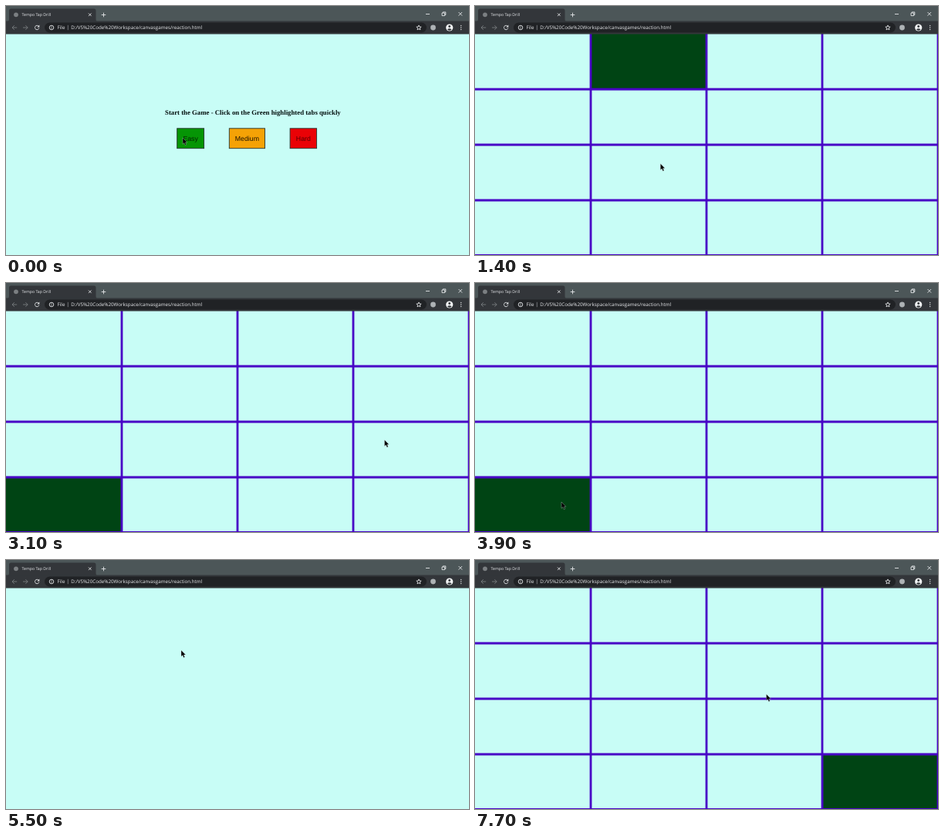
An HTML page for the animation above (8 s loop, 600x323 px).

```html
<!DOCTYPE html>
<html lang="en">
<head>
<meta charset="utf-8">
<title>Tempo Tap Drill</title>
<style>
html, body { margin: 0; width: 100%; height: 100%; overflow: hidden; background: #c8fdf6; }
svg { display: block; width: 600px; height: 323px; }
text { text-rendering: geometricPrecision; white-space: pre; }
.ui { font-family: "Open Sans", "Noto Sans", sans-serif; fill: #e8eaed; }
.head { font: bold 8.78px "Liberation Serif", serif; fill: #051010; }
.btn { font: 8.78px "Liberation Sans", sans-serif; text-anchor: middle; }
.line { fill: none; stroke: #e3e5e7; stroke-width: .9; }
.dim { stroke: #797d80; }
</style>
</head>
<body>
<svg viewBox="0 0 600 323" xmlns="http://www.w3.org/2000/svg">
  <rect width="600" height="323" fill="#c8fdf6"/>

  <g id="menu">
    <text class="head" x="206" y="141.2">Start the Game - Click on the Green highlighted tabs quickly</text>
    <g id="buttons"></g>
  </g>

  <g id="board">
    <rect id="cell" width="150" height="72" fill="#004414"/>
    <path id="lines" fill="none" stroke="#4802c6" stroke-width="2.8"/>
  </g>

  <g id="browser">
    <rect width="600" height="20" fill="#4c5658"/>
    <path d="M2 20Q4 20 4 17V6Q4 3.500 6.500 3.500H114Q116.500 3.500 116.500 6V17Q116.500 20 118.500 20Z" fill="#33363a"/>
    <rect y="19.500" width="600" height="17" fill="#33363a"/>
    <rect x="50" y="21.500" width="495" height="13" rx="6.500" fill="#202225"/>
    <circle id="icon" cx="13" cy="11.300" r="2.900" fill="#7b7f82"/>
    <text class="ui" x="20.500" y="13.300" font-size="5.200">Tempo Tap Drill</text>
    <path class="line" d="M107 9.500l3.600 3.600m0-3.600l-3.600 3.600M123.700 11.500h5.600m-2.800-2.800v5.600"/>
    <path class="line" stroke-width=".7" d="M544 10.500h5M565 9h3.600v3.600H565ZM566.200 9V7.900h3.600v3.600h-1.200M586.500 8l4.600 4.600m0-4.600l-4.600 4.600"/>
    <path class="line dim" d="M14.200 28H8m2.800-2.800L8 28l2.800 2.800M22 28h6.200m-2.800-2.800L28.200 28l-2.800 2.800"/>
    <g id="reload">
      <path class="line" d="M42.300 26.300A2.700 2.700 0 1 0 42.800 28.700"/>
      <path d="M43.300 24.600v2.900h-2.900Z" fill="#e3e5e7"/>
    </g>
    <path id="stop" class="line" stroke-width="1.100" d="M37.800 25.600l4.800 4.800m0-4.800l-4.800 4.800"/>
    <circle class="line" cx="59" cy="28" r="2.800" stroke-width=".7"/>
    <path class="line" stroke-width=".7" d="M59 27.700v1.700M59 26.300v.7"/>
    <text class="ui" x="66.500" y="30.200" font-size="6.250">File</text>
    <path class="line dim" stroke-width=".6" d="M80.300 24.800v6.400"/>
    <text class="ui" x="84.300" y="30.200" font-size="6.250">D:/VS%20Code%20Workspace/canvasgames/reaction.html</text>
    <path id="star" class="line" stroke-width=".7"/>
    <circle cx="553.500" cy="28" r="3.400" fill="#aeb2b5"/>
    <circle cx="574.700" cy="28" r="4.600" fill="#f1f3f4"/>
    <circle cx="574.700" cy="26.500" r="1.400" fill="#33363a"/>
    <path d="M571.900 30.500q2.800-2.300 5.600 0q-2.800 2.400-5.600 0Z" fill="#33363a"/>
    <g fill="#e3e5e7">
      <circle cx="589.700" cy="25.500" r=".7"/>
      <circle cx="589.700" cy="28" r=".7"/>
      <circle cx="589.700" cy="30.500" r=".7"/>
    </g>
  </g>

  <path id="cursor" d="M0 0V8.300L1.900 6.600L3.200 9.700L4.700 9.100L3.400 6.100H5.900Z" fill="#000" stroke="#eefffc" stroke-width=".3"/>
</svg>
<script>
const LOOP = 8000, CELL_W = 150, CELL_H = 72, TOP = 36;
const $ = id => document.getElementById(id);
const show = (id, on) => $(id).setAttribute("visibility", on ? "visible" : "hidden");

// label, left, width, fill, text colour
const buttons = [
  ["Easy", 221.3, 35.7, "#059505", "#012401"],
  ["Medium", 288.9, 47, "#f5a206", "#1d1200"],
  ["Hard", 367.7, 35.3, "#ea0206", "#560000"]
];
$("buttons").innerHTML = buttons.map(([label, x, w, fill, ink]) =>
  `<rect x="${x + .4}" y="158.800" width="${w - .8}" height="25.900" fill="${fill}" stroke="#26332f" stroke-width=".9"/>
   <text class="btn" x="${x + w / 2}" y="174.500" fill="${ink}">${label}</text>`).join("");

$("lines").setAttribute("d", [1, 2, 3, 4].map(i => {
  const x = i * CELL_W, y = TOP + i * CELL_H;
  return `M${x} ${TOP}V323M0 ${Math.min(y, 323.4)}H600`;
}).join(""));

$("star").setAttribute("d", "M" + Array.from({ length: 10 }, (_, i) => {
  const r = i % 2 ? 1.5 : 3.3, a = i * Math.PI / 5;
  return `${(535 + r * Math.sin(a)).toFixed(2)} ${(28.2 - r * Math.cos(a)).toFixed(2)}`;
}).join("L") + "Z");

// start time, scene, lit row, lit column
const scenes = [
  [0, "menu"],
  [400, "board", 0, 1],
  [2100, "board", 2, 3],
  [3100, "board", 3, 0],
  [4000, "board", 1, 3],
  [5500, "blank"],
  [6300, "menu"],
  [7000, "board", 3, 3]
];

// start time, end time, x, y reached
const moves = [
  [0, 0, 229, 171],
  [950, 1200, 240.3, 204.5],
  [1400, 2150, 262.3, 82.5],
  [2450, 2900, 490.5, 203.5],
  [3150, 3900, 112, 284],
  [4150, 4600, 229.3, 113.3],
  [5450, 5500, 227, 117],
  [5750, 5800, 219.5, 130],
  [6050, 6450, 242, 171.5],
  [7250, 7700, 377.5, 174]
];

const ease = p => p * p * (3 - 2 * p);

function pointer(t) {
  let [, , x, y] = moves[0];
  for (const [from, to, nx, ny] of moves.slice(1)) {
    if (t <= from) break;
    const k = ease(Math.min(1, (t - from) / (to - from)));
    x += (nx - x) * k;
    y += (ny - y) * k;
  }
  return [x, y];
}

function draw(t) {
  const [, scene, row, col] = scenes.filter(s => s[0] <= t).pop();
  show("menu", scene === "menu");
  show("board", scene === "board");
  if (scene === "board") {
    $("cell").setAttribute("x", col * CELL_W);
    $("cell").setAttribute("y", TOP + row * CELL_H);
  }
  const loading = t >= 6200 && t < 6700;
  show("icon", !loading);
  show("reload", !loading);
  show("stop", loading);
  const [x, y] = pointer(t);
  $("cursor").setAttribute("transform", `translate(${x.toFixed(2)} ${y.toFixed(2)})`);
}

const start = performance.now();
function tick() {
  draw((performance.now() - start) % LOOP);
  requestAnimationFrame(tick);
}
tick();
</script>
</body>
</html>
```
